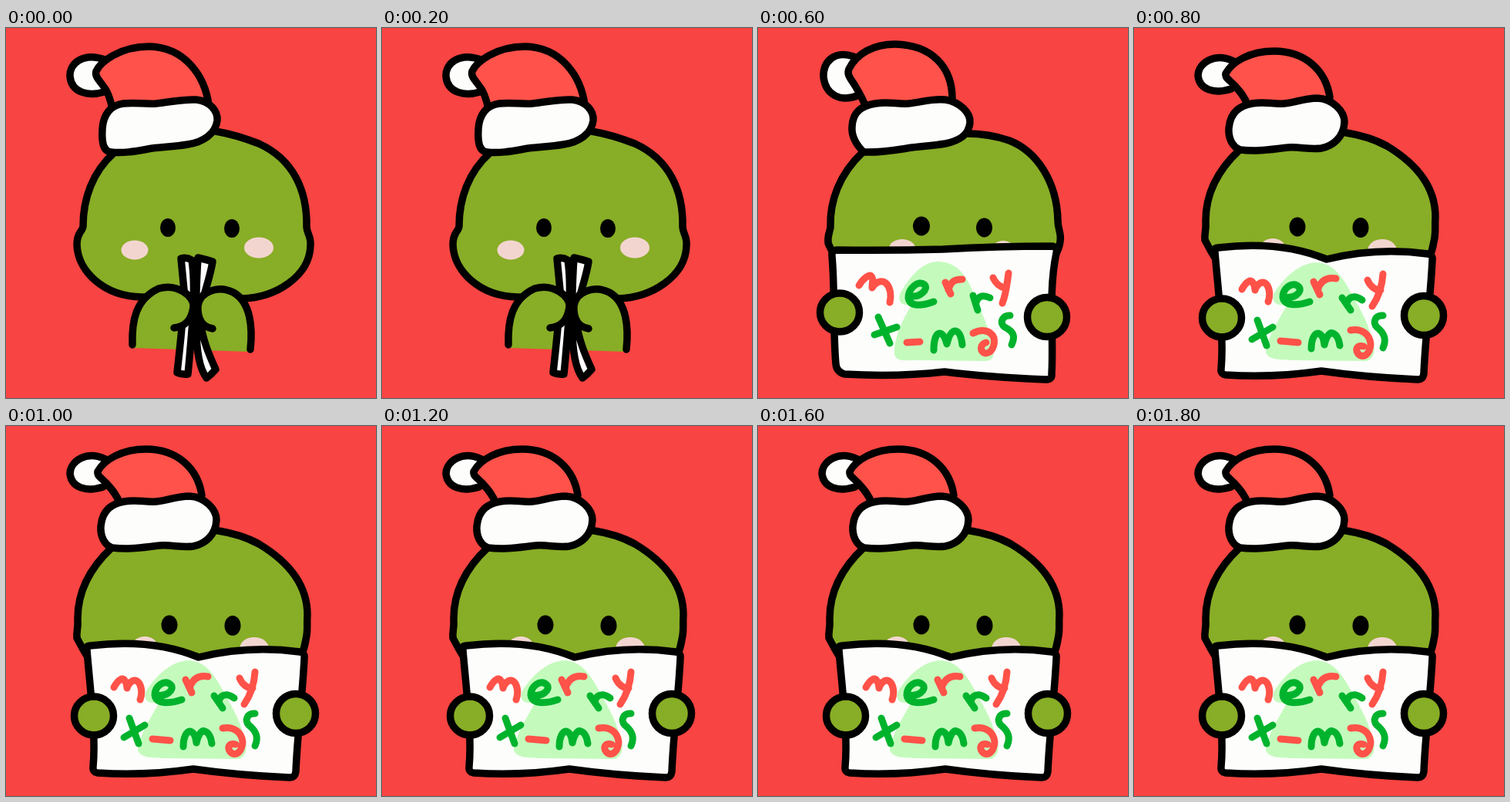
An HTML page that plays this animation: 480 px wide and 480 px high, repeating every 1.9 s.

```html
<!DOCTYPE html>
<html lang="en">
<head>
<meta charset="utf-8">
<title>Merry X-mas card</title>
<style>
  html, body { margin: 0; height: 100%; overflow: hidden; background: #f84442; }
  svg { display: block; width: 100vw; height: 100vh; }
  path, ellipse { fill: none; stroke-width: 9.5; stroke-linecap: round; stroke-linejoin: round; }
  .green, .red, .white { stroke: #000; }
  .green { fill: #88ad26; }
  .red { fill: #ff524a; }
  .white { fill: #fdfdfb; }
  .body { fill: #88ad26; }
  .eye { fill: #000; }
  .cheek { fill: #f3d5d0; }
  .tree { fill: #c4fbbd; }
  .inkRed, .inkGreen { stroke-width: 9; }
  .inkRed { stroke: #ff5249; }
  .inkGreen { stroke: #00b32d; }
</style>
</head>
<body>
<svg id="stage" viewBox="0 0 480 480"></svg>
<script>
const STEP = 100, STEPS = 19, FOLD_X = 243;

// face: cx cy rx ry for both eyes, then both cheeks; hands: two centres
const closed = {
  head: 'M140 162C112 187 100 222 100 257C100 264 92 264 92 281C93 315 126 348 176 349L306 351C350 350 394 322 395 282C396 270 390 266 390 258C391 210 372 170 328 150C310 143 290 137 272 134',
  face: '210 259 10 12 293 260 10 12 167 288 17.5 12.5 328 285 19 13.5',
  pom: 'M128 41C100 31 82 46 83 63C85 84 107 89 127 83',
  hat: 'M138 105C136 95 132 82 126 75C120 67 115 62 117 56C122 45 146 24 186 24C232 25 258 62 263 100',
  brim: 'M136 161C126 160 124 148 125 131C126 112 136 100 152 98C168 96 178 99 195 98C215 96 228 92 247 93C265 95 275 108 274 120C272 137 256 148 236 151C218 154 206 154 190 156C172 159 155 163 136 161Z',
  body: 'M165 380L163 415L317 420L316 380L245 345Z',
  strips: 'M227 299Q234 297 241 301C244 320 244 350 242 380C240 405 238 430 236 449Q228 450 222 447C226 410 231 370 231 340ZM249 298Q258 300 268 303C264 330 252 352 252 380C255 405 264 425 272 443Q266 450 260 454C250 440 247 415 247 390C246 360 247 330 249 298Z',
  arms: 'M164 411C163 380 168 352 198 338C222 331 245 348 243 362C241 378 232 388 218 389M317 417C320 390 318 356 295 343C275 333 252 342 249 360C248 378 255 388 268 390'
};

const half = {
  head: 'M135 160C108 183 95 215 96 252C97 262 92 265 93 279C97 315 125 343 165 346L318 347C360 344 391 310 391 277C391 266 388 262 388 250C389 195 360 158 325 147C308 141 290 139 272 136',
  face: '210 258 10 12.5 293 259 10.5 12.5 186 281 17 12 324 283 17 13',
  pom: 'M118 54C92 44 78 60 79 76C80 97 103 107 124 99',
  hat: 'M135 113C130 103 126 98 121 91C113 84 111 80 112 73C118 54 145 36 183 35C226 35 255 62 260 92',
  brim: 'M134 161C126 156 125 146 126 136C128 112 140 103 154 99C170 95 180 97 195 95C215 93 225 90 243 92C262 94 277 108 276 127C274 143 262 150 243 154C228 157 220 156 205 159C180 164 155 167 134 161Z',
  card: 'M170 284Q205 297 243 315Q275 301 309 293Q314 292 314 298C319 345 306 400 304 448Q303 454 297 451Q270 443 245 431Q210 447 180 451Q174 452 174 447C171 390 165 340 165 288Q165 282 170 284Z',
  fold: 'M243 315L245 431',
  tree: 'M242 327C235 340 218 370 210 388L214 425L243 422L268 420L282 395C262 370 255 345 242 327Z',
  inkRed: 'M185 331C195 321 202 322 203 338C205 332 215 328 220 335L222 364M270 328C274 336 282 339 287 335M291 323L272 356M227 404C236 395 245 389 252 396C258 401 258 407 259 411',
  inkGreen: 'M234 341L236 364M249 336L255 360M253 349C256 337 261 334 267 338M203 391L224 422M223 391L206 421M281 389C274 384 268 392 274 399C282 407 284 415 281 426',
  hands: '183 365 304 372'
};

const wide = {
  head: 'M136 161C105 190 93 225 94 258C94 264 90 266 91 279C96 292 125 343 165 346L318 347C360 344 390 296 392 277C394 266 389 262 389 250C388 200 362 160 326 146C306 139 286 137 270 137',
  face: '212 257 11 12.5 293.5 259 10.5 12.5 187 286 17 12 318 288 15 12',
  pom: 'M124 37C98 28 84 45 85 64C88 87 107 97 131 87',
  hat: 'M138 98C134 88 130 82 126 75C119 64 115 60 118 53C128 33 150 21 178 21C225 22 252 50 252 92',
  brim: 'M137 161C127 151 121 140 122 128C123 108 135 101 152 98C170 95 180 99 195 98C215 96 225 91 243 93C262 96 276 110 275 123C273 141 258 147 243 150C225 153 215 153 200 155C180 158 160 162 137 161Z',
  card: 'M103 288Q170 289 240 287Q310 283 381 283Q389 284 387 292C376 345 384 400 381 448Q382 457 372 456Q300 453 242 446Q180 453 112 449Q102 446 101 436C97 390 100 340 96 296Q95 288 103 288Z',
  tree: 'M235 303C213 302 196 324 184 345C181 357 188 360 199 360C190 374 176 400 177 424C180 433 190 431 205 431L296 432C306 431 308 424 302 405C298 385 290 368 282 352C274 325 260 304 235 303Z',
  inkRed: 'M131 334C137 324 145 319 147 322C150 325 148 331 148 337C152 330 160 326 166 331C172 337 173 347 171 356M243 330L250 345M247 340C250 328 256 326 265 326M305 324C308 331 314 336 320 337M325 318C323 332 322 345 317 357M193 408L210 407M279 396C290 390 302 392 306 402C308 412 303 422 295 422C287 420 288 410 296 408',
  inkGreen: 'M197 347C209 351 222 339 216 333C208 326 195 338 195 350C197 362 212 361 228 355M279 347L285 366M283 356C286 347 292 346 301 350M156 375L171 409M151 398L180 388M228 418C228 405 231 397 235 396C240 396 243 402 245 410C247 402 250 393 256 393C262 394 264 402 265 411M327 373C318 372 312 382 320 388C332 394 334 400 329 411',
  hands: '106 369 375 375'
};

const rest = {
  head: 'M137 158C108 185 93 215 93 250C94 264 91 266 92 275C100 290 125 343 165 346L318 347C360 344 385 305 389 277C392 266 390 260 391 245C391 207 368 177 328 153C310 143 290 138 270 135',
  face: '212 258 10.5 12.5 294 259 10.5 13 180 285 16 12 322 288 18.5 14',
  pom: 'M129 43C104 31 83 46 83 62C85 80 104 86 126 79',
  hat: 'M147 99C143 88 137 82 130 74C122 66 118 64 119 59C127 44 150 30 182 30C222 30 249 55 254 90',
  brim: 'M138 158C128 155 122 143 123 130C125 108 138 101 153 98C170 95 180 99 195 98C210 97 220 91 238 91C258 92 273 108 273 122C272 142 258 153 243 156C228 158 215 154 200 155C180 157 160 161 138 158Z',
  card: 'M109 285Q190 275 250 300Q315 284 381 293Q388 294 387 301C385 345 378 400 376 448Q375 457 367 456Q300 453 243 445Q180 454 119 450Q112 449 113 442C117 400 109 340 105 291Q103 285 109 285Z',
  tree: 'M237 304C213 305 194 325 181 345C178 357 186 360 198 360C190 375 172 402 171 421C175 431 190 430 205 431L300 432C310 431 316 420 308 400C303 382 294 365 284 348C272 325 260 305 237 304Z',
  inkRed: 'M140 339C146 328 152 326 154 330C156 333 157 336 157 340C160 331 168 326 173 334C177 341 176 350 174 355M233 329L241 346M238 340C242 328 250 323 262 325M303 327C306 335 314 341 320 340M323 319C322 335 318 348 309 361M190 406L213 408M281 392C296 389 306 398 307 410C306 424 297 429 291 423C286 416 290 411 298 413',
  inkGreen: 'M195 349C208 352 219 342 214 336C206 327 193 338 193 349C195 362 214 360 228 355M270 350L281 366M276 358C278 348 286 346 296 353M160 379L172 412M153 404L180 388M230 416C230 404 234 396 239 396C245 398 246 404 247 411C249 402 253 394 258 396C264 398 266 405 267 412M323 373C313 372 309 382 315 388C325 396 328 404 323 415',
  hands: '114 376 376 373'
};

const NUMBER = /[\d.]+/g;
const numbers = text => text.match(NUMBER).map(Number);

// Blend the parts two poses share; parts only in b are kept as they are
function mix(a, b, k) {
  const pose = { ...b };
  for (const key in b) {
    if (!a[key]) continue;
    const from = numbers(a[key]);
    let i = 0;
    pose[key] = b[key].replace(NUMBER, n => from[i] + (n - from[i++]) * k);
  }
  return pose;
}

// Narrow the named parts towards the fold
function squeeze(pose, k, keys) {
  const parts = {};
  for (const key of keys)
    parts[key] = pose[key].replace(/([\d.]+) ([\d.]+)/g,
      (_, x, y) => `${FOLD_X + (x - FOLD_X) * k} ${y}`);
  return parts;
}

const ink = ['tree', 'inkRed', 'inkGreen'];
const opening = [
  closed,
  mix(half, closed, .75),
  closed,
  { ...mix(closed, half, .6), ...squeeze(half, .6, ['card', 'fold', 'hands', ...ink]) },
  half,
  { ...mix(half, wide, .55), ...squeeze(wide, .75, ink) },
  wide
];
const sway = [rest, mix(rest, wide, .4)];

const path = (d, cls) => d ? `<path class="${cls}" d="${d}"/>` : '';
const oval = (cx, cy, rx, ry, cls) =>
  `<ellipse class="${cls}" cx="${cx}" cy="${cy}" rx="${rx}" ry="${ry}"/>`;

function draw(p) {
  const face = numbers(p.face);
  const [lx, ly, rx, ry] = p.hands ? numbers(p.hands) : [];
  return path(p.head, 'green') +
    [0, 4, 8, 12].map(i => oval(...face.slice(i, i + 4), i < 8 ? 'eye' : 'cheek')).join('') +
    path(p.pom, 'white') + path(p.hat, 'red') + path(p.brim, 'white') +
    path(p.body, 'body') + path(p.strips, 'white') + path(p.arms, 'green') +
    path(p.card, 'white') + path(p.tree, 'tree') +
    path(p.inkRed, 'inkRed') + path(p.inkGreen, 'inkGreen') + path(p.fold, 'white') +
    (p.hands ? oval(lx, ly, 25.5, 25, 'green') + oval(rx, ry, 25.5, 25.5, 'green') : '');
}

const stage = document.getElementById('stage');
let shown = -1;
function tick() {
  const step = Math.floor(performance.now() / STEP) % STEPS;
  if (step !== shown) {
    stage.innerHTML = draw(opening[step] || sway[step % 2]);
    shown = step;
  }
  requestAnimationFrame(tick);
}
tick();
</script>
</body>
</html>
```
